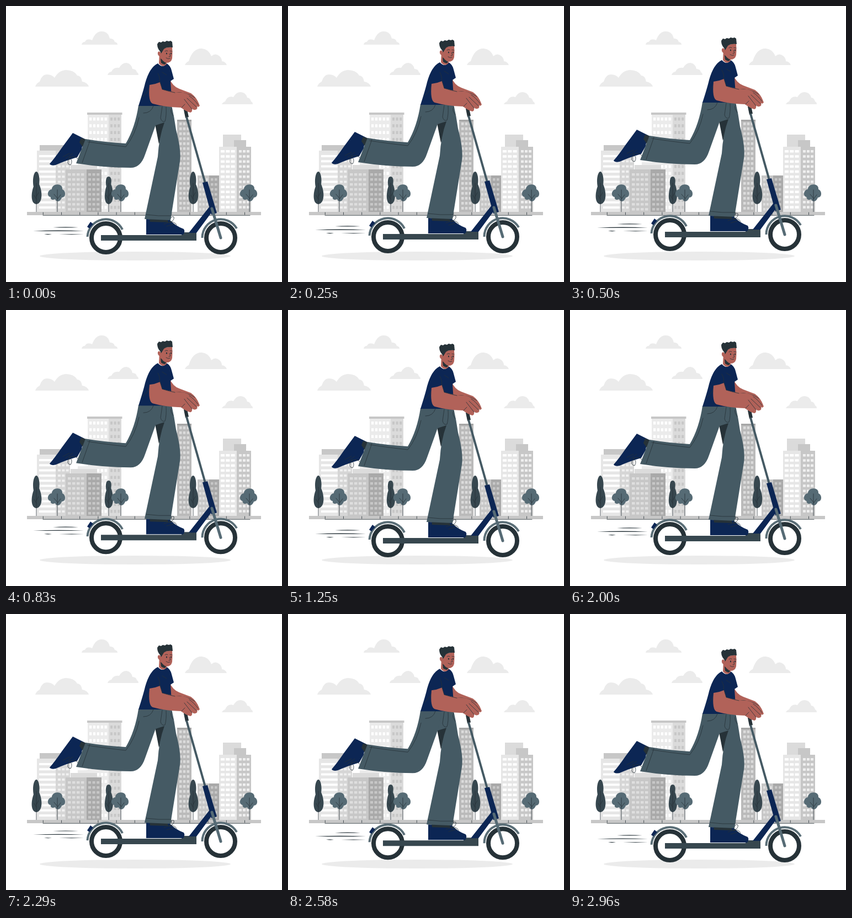
Recreate the animation shown at these times as an HTML page. Size 500 by 500 pixels, loop 3 s.

```html
<!DOCTYPE html>
<html lang="en">
<head>
<meta charset="utf-8">
<title>Scooter ride</title>
<style>
html, body { margin: 0; width: 100%; height: 100%; overflow: hidden; background: #fff; }
svg { display: block; width: 100vw; height: 100vh; }
.line { fill: none; stroke: #263238; stroke-width: .8; stroke-linecap: round; stroke-linejoin: round; }
.ink { fill: #263238; }
.navy { fill: #0c2654; }
.slate { fill: #455a64; }
.skin { fill: #b16259; }
</style>
</head>
<body>
<svg viewBox="0 0 500 500">
  <g fill="#ebebeb">
    <path d="M137 70Q138 65 143 65Q146 58 156 62Q162 46 173 46Q185 46 188 59Q195 58 197 65Q202 66 202 70Z"/>
    <path d="M324 107Q326 102 331 100Q338 77 354 77Q367 78 372 91Q379 84 387 91Q391 95 391 100Q398 101 400 107Z"/>
    <path d="M53 146Q55 140 61 137Q65 124 74 124Q83 124 88 130Q96 116 109 116Q123 116 129 126Q136 126 138 137Q148 139 150 146Z"/>
    <path d="M184 125Q185 120 191 119Q195 110 205 112Q210 103 218 103Q227 104 229 114Q236 114 237 120Q240 121 240 125Z"/>
    <path d="M391 178Q393 174 397 173Q401 162 412 165Q417 156 425 156Q434 156 437 166Q442 166 444 173Q447 174 447 178Z"/>
  </g>
  <g id="city"></g>
  <g id="trees"></g>
  <path fill="#c7c7c7" d="M38 373H462V379H38Z"/>
  <path id="ticks" class="line"/>
  <ellipse cx="234" cy="453" rx="173" ry="8" fill="#ebebeb"/>

  <g id="rider">
    <path class="ink" d="M85 401Q108 399.7 131 401Q108 402 85 401ZM49 407.4Q95 405.8 141 407.4Q95 408.4 49 407.4ZM69 413.5Q76 412.6 83 413.8Q76 414.8 69 413.5ZM96 413.8Q119 412.6 141 413.8Q119 414.6 96 413.8Z"/>

    <path class="skin" d="M296 131Q302 146 314 150L335 158Q345 165 350 178L338 185L298 160Z"/>
    <path class="line" d="M305 157Q327 155 342 166"/>

    <path class="ink" d="M322 188L328 187L331 201L325 203Z"/>
    <path d="M327 201L361 321" stroke="#455a64" stroke-width="4"/>
    <path d="M147.5 418A33.5 33.5 0 0 1 211 405M355.5 420A33.5 33.5 0 0 1 418 403" fill="none" stroke="#5a6e77" stroke-width="4"/>
    <path class="navy" d="M147 400L153 391L158 395L151 403Z"/>
    <g fill="#fff" stroke="#263238" stroke-width="8">
      <circle cx="181" cy="420" r="26"/><circle cx="389" cy="420" r="26"/>
    </g>
    <path fill="#37474f" d="M172 415H318V410H345V425H172Z"/>
    <path class="navy" d="M331 411L369 363L376 369L345 411Z"/>
    <path class="navy" d="M356 320L365 318L382 375L372 378Z"/>
    <path d="M373 367L389 420" stroke="#566b75" stroke-width="5" stroke-linecap="round"/>

    <path class="navy" d="M121 230L143 241Q138 251 137 260L129 274Q108 280 90 288Q82 290 79 286Q88 276 101 257Z"/>
    <path class="ink" d="M136 239L146 242L140 257L133 247Z"/>
    <path class="line" d="M103 273L115 267M108 276L121 267M115 274Q108 287 117 288Q122 281 115 274Q126 271 130 277"/>
    <path class="ink" d="M270 214L290 207L277 250Z"/>
    <path class="slate" d="M240 180H299Q298 204 271 216L252 269Q244 293 226 293Q178 293 127 285L144 241Q180 247 217 249Q234 220 240 180Z"/>
    <path class="line" d="M241 202Q234 234 217 255Q188 252 148 246M152 244L138 284"/>

    <path class="navy" d="M254 386L296 387Q306 398 322 404Q325 409 321 414H254Z"/>
    <path class="ink" d="M260 384L292 384L294 392L261 391Z"/>
    <path class="line" d="M286 395L301 390M291 399L305 395M296 392Q298 379 304 382Q306 388 296 393Q306 389 309 397"/>
    <path class="slate" d="M278 180H300Q305 202 308 224Q318 262 315 282L298 388L251 386L275 273Q277 238 287 211L271 216Z"/>
    <path class="line" d="M254 378Q276 381 299 380M267 181Q263 194 249 194M283 182L280 203Q282 211 288 209Q291 199 290 183M300 185Q296 190 303 199"/>

    <path class="navy" d="M275 104Q284 114 291 104Q298 108 300 117L304 132L298 136L301 181H240Q249 153 252 140Q260 111 275 104Z"/>
    <path class="line" d="M275 122Q280 130 278 138M283 120L291 125M247 165Q254 160 260 150"/>
    <path class="skin" d="M260 143Q270 142 279 138L283 151Q304 157 321 157Q337 160 351 180Q350 184 346 182Q348 187 343 188Q340 189 337 186Q338 192 334 193Q326 191 317 184Q287 183 266 177Q257 174 260 143Z"/>
    <path class="line" d="M279 138L283 151Q296 155 306 157M323 169Q330 178 337 187M328 167L345 183M332 163Q341 169 348 179M318 184L324 178"/>

    <path class="skin" d="M278 84L277 104Q284 113 291 105L290 96Z"/>
    <path class="ink" d="M280 95L290 102Q289 109 281 103Z"/>
    <path class="skin" d="M279 77L301 74Q302 85 301 95Q299 103 291 103Q283 101 280 92Q274 90 275 84Q278 80 280 85Z"/>
    <path class="ink" d="M274 69L277 65L281 66L284 64L288 65L291 63L295 64L298 63L301 65L302 75Q291 74 286 78Q283 83 281 86L279 82Q274 77 274 69Z"/>
    <ellipse class="ink" cx="291" cy="86" rx="1.1" ry="1.6"/><ellipse class="ink" cx="299" cy="86" rx="1" ry="1.6"/>
    <path class="line" d="M288 82Q290 80 293 81.5M297 81.5L301 82M296 86L298 91L295 92M290 94Q294 97 297 95"/>
  </g>
</svg>
<script>
const PERIOD = 1500;
const LIFT = 8;
const el = id => document.getElementById(id);
const rect = (x, y, w, h, fill) => `<path fill="${fill}" d="M${x} ${y}h${w}v${h}h${-w}z"/>`;

function windows(x, y, cols, rows, dx, dy, w, h, fill) {
  let d = '';
  for (let r = 0; r < rows; r++)
    for (let c = 0; c < cols; c++) d += `M${x + c * dx} ${y + r * dy}h${w}v${h}h${-w}z`;
  return `<path fill="${fill}" d="${d}"/>`;
}

el('city').innerHTML = [
  rect(148, 196, 38, 177, '#ebebeb'), rect(186, 196, 23, 177, '#dbdbdb'),
  rect(147, 193, 63.5, 4, '#c7c7c7'),
  windows(151, 202, 5, 14, 6.9, 12.3, 4.2, 5.5, '#fff'),
  windows(189, 202, 3, 14, 6.6, 12.3, 4, 5.5, '#c7c7c7'),

  rect(61, 252, 47, 10, '#c7c7c7'),
  rect(56, 262, 34, 111, '#e6e6e6'), rect(90, 262, 26, 111, '#d6d6d6'),
  windows(60, 270, 1, 11, 1, 9.3, 30, 4, '#fff'),
  windows(94, 270, 3, 11, 7.3, 9.3, 5, 4, '#f0f0f0'),

  rect(130, 283, 30, 6, '#ebebeb'), rect(117, 288, 48, 8, '#dbdbdb'),
  rect(108, 296, 38, 77, '#c7c7c7'), rect(146, 296, 27, 77, '#a9a9a9'),
  windows(112, 303, 4, 8, 8, 9, 5.5, 4.5, '#dedede'),
  windows(149, 303, 3, 8, 7.6, 9, 5, 4.5, '#c7c7c7'),

  rect(310, 206, 26, 167, '#bababa'), rect(310, 206, 26, 3, '#a6a6a6'),
  windows(314, 211, 3, 18, 6.8, 9, 4.5, 4.7, '#dbdbdb'),

  rect(347, 307, 21, 66, '#c7c7c7'), rect(368, 307, 18, 66, '#a9a9a9'),
  windows(350, 312, 3, 7, 6, 9, 4, 4.5, '#dedede'),
  windows(371, 312, 2, 7, 7, 9, 4.5, 4.5, '#c7c7c7'),

  rect(393, 233, 33, 22, '#dbdbdb'), rect(413, 243, 22, 12, '#c7c7c7'),
  rect(386, 255, 32, 118, '#e6e6e6'), rect(418, 255, 26, 118, '#c7c7c7'),
  windows(389, 261, 3, 12, 9.3, 9.2, 7, 4.5, '#fff'),
  windows(422, 261, 3, 12, 7, 9.2, 5, 4.5, '#efefef')
].join('');

const tallTree = (x, top, wide) => `<g transform="translate(${x} 0)">
  <path fill="#37474f" d="M0 ${top}C5 ${top} 8 313 6 323C14 338 13 358 0 359C-13 358 -11 338 -6 327C-9 313 -5 ${top} 0 ${top}Z"
    transform="scale(${wide} 1)"/>
  <path class="line" d="M0 321V373M0 345L4 338M0 350L-4 343"/></g>`;
const roundTree = x => `<g transform="translate(${x} 0)">
  <path fill="#566b75" d="M-9 332C-9 321 11 320 10 332C17 335 17 347 9 347C6 356 -2 355 -3 350C-9 353 -12 349 -11 346C-19 345 -17 333 -9 332Z"/>
  <path class="line" d="M1 333V373M1 350L7 342M1 348L-5 341"/></g>`;
el('trees').innerHTML =
  [[55, 300, .85], [186, 309, .72], [339, 300, .84]].map(t => tallTree(...t)).join('') +
  [92, 207, 440].map(roundTree).join('');

let ticks = 'M67 379.3H442';
for (let i = 0; i < 12; i++) ticks += `M${67.3 + i * 33.2} 374V378`;
el('ticks').setAttribute('d', ticks);

function draw(ms) {
  const lift = LIFT * (1 - Math.cos(2 * Math.PI * ms / PERIOD)) / 2;
  el('rider').setAttribute('transform', `translate(0 ${-lift})`);
}

let start;
function tick(now) {
  start ??= now;
  draw(now - start);
  requestAnimationFrame(tick);
}
draw(0);
requestAnimationFrame(tick);
</script>
</body>
</html>
```
